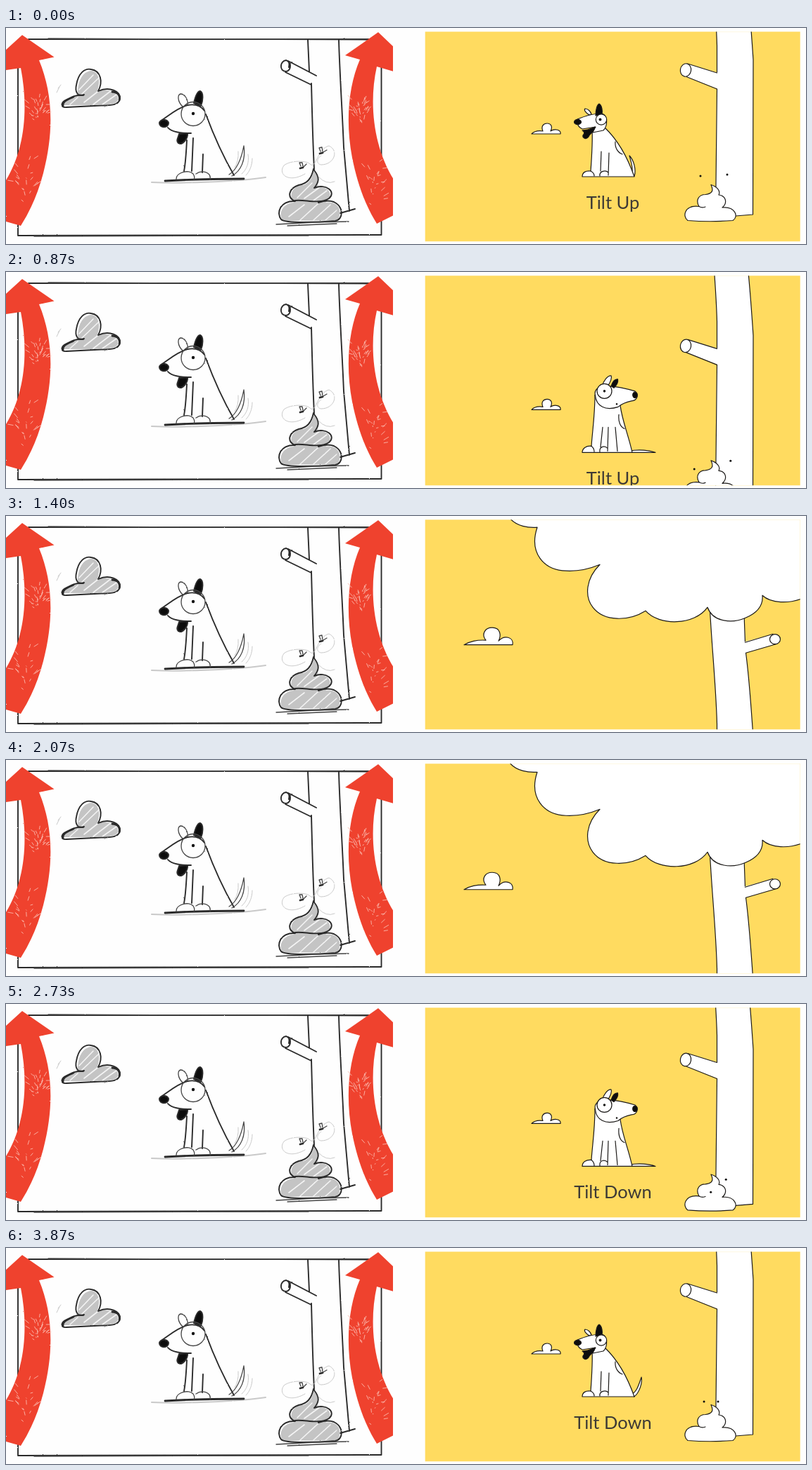
Write an HTML page that moves like this. It is 1137 px wide and 308 px high and loops after 3.94 s.

```html
<!DOCTYPE html>
<html lang="en">
<head>
<meta charset="utf-8">
<title>Tilt</title>
<style>
  html, body { margin: 0; width: 100%; height: 100%; overflow: hidden; background: #fefefe; }
  svg { display: block; width: 1137px; height: 308px; }
  .ink, .pencil { stroke-linecap: round; stroke-linejoin: round; }
  .ink { fill: #fff; stroke: #1c1a18; stroke-width: 1.2; }
  .pencil { fill: none; stroke: #2b2b2b; stroke-width: 1.9; }
  .line { fill: none; }
  .solid { fill: #0d0d0d; }
  .gray { fill: #c4c4c4; stroke: none; }
  .faint { stroke: #c9c9c9; stroke-width: 1; }
  .thin { stroke: #444; stroke-width: 1.3; }
  .bold { stroke-width: 2.8; }
  .hatch { stroke: #f4f4f4; stroke-width: 1.6; }
  text { font: 25.5px Lato, "Open Sans", sans-serif; fill: #3d3a35; text-anchor: middle; }
</style>
</head>
<body>
<svg viewBox="0 0 1137 308">
  <defs>
    <filter id="rough" filterUnits="userSpaceOnUse" x="0" y="0" width="552" height="308">
      <feTurbulence type="fractalNoise" baseFrequency=".5" numOctaves="2" seed="4" result="n"/>
      <feDisplacementMap in="SourceGraphic" in2="n" scale="1.7" xChannelSelector="R" yChannelSelector="G"/>
    </filter>
    <clipPath id="left"><rect width="550" height="308"/></clipPath>
    <clipPath id="stage"><rect x="595.7" y="5.3" width="533" height="299"/></clipPath>
  </defs>

  <g clip-path="url(#left)">
    <g class="pencil" filter="url(#rough)">
      <path d="M32 16H533.500V295M17 40V296L533 295"/>
      <path class="thin" d="M60 15L520 17M40 297L430 296"/>

      <!-- cloud -->
      <path class="gray" d="M82 110C81 103 92 97 102 97C101 76 109 62 121 61C133 62 134 77 130 90C147 86 160 92 159 102C158 109 146 109 132 110Z"/>
      <path class="hatch" d="M104 88L124 67M108 94L131 72M111 106L130 91M124 109L150 89M137 109L157 95M91 109L102 99"/>
      <path d="M111 95C101 99 98 90 100 81C103 64 112 57 121 59C135 61 138 77 131 90C147 83 163 90 162 101C160 112 144 110 126 111L86 113C76 114 78 105 87 102C94 98 100 95 110 96"/>
      <path class="bold" d="M81 111C80 104 88 102 96 98M151 91Q163 92 161 103"/>
      <path class="faint" d="M72 92l4-8M74 86l4-5"/>

      <!-- tree -->
      <path d="M429 17L431 62M434 79C435 120 436 160 438 202M473 17C474 60 478 120 480 170L488 261M475 264L496 258"/>
      <path d="M401 47L441 68M397 63L434 81M400 47C407 52 404 61 398 62C388 62 389 47 398 46Q404 47 402 56"/>

      <!-- dog -->
      <path class="faint" d="M207 220C250 222 330 219 369 213" style="stroke-width:2"/>
      <path class="bold" d="M226 218C260 216 300 215 338 215"/>
      <path class="thin" d="M251 112C243 104 244 95 248 94C254 94 259 102 258 108"/>
      <path class="solid" d="M267 107C269 98 272 90 276 90C281 92 280 104 277 111Z"/>
      <path d="M222 131C234 123 244 114 258 110Q274 107 282 118M230 142C236 149 249 150 263 150"/>
      <circle class="thin" cx="266" cy="122.500" r="17"/>
      <circle cx="266" cy="122" r="2.2" fill="#111" stroke="none"/>
      <ellipse class="solid" cx="224.500" cy="136" rx="6.500" ry="5.300"/>
      <path class="solid" d="M246 151L258 150C259 158 250 168 245 164C241 161 245 156 246 151Z"/>
      <path d="M284 123C294 150 308 182 324 210M257 160C256 180 255 194 253 204M266 157L264 204M280 180L279 206"/>
      <path class="thin" d="M242 216C241 206 260 201 266 208C269 213 267 216 267 216M270 208C278 202 292 205 290 216"/>
      <path class="thin" d="M321 211C334 204 341 188 338 168C335 184 330 201 317 209"/>
      <path class="faint" d="M344 180C346 192 342 202 335 208M350 186C350 196 346 205 341 210M330 176Q331 190 325 199"/>

      <!-- pile and flies -->
      <path class="gray" d="M394 275C386 267 392 250 409 249C400 238 409 223 423 224C433 220 436 211 437 204C445 211 444 221 440 227C460 225 467 238 454 249C473 245 479 263 471 274Z"/>
      <path class="hatch" d="M414 242L435 221M424 243L446 227M437 246L456 232M402 269L424 252M418 274L443 251M437 274L461 252M454 274L470 260"/>
      <path d="M437 201C434 215 428 222 416 224C401 229 399 242 411 247C389 246 384 264 391 273C397 279 445 277 468 275C480 273 480 255 466 248C458 245 450 247 444 249M438 203C447 214 444 221 438 228C455 221 470 234 459 243C444 252 425 244 411 246"/>
      <path class="thin" d="M384 280L440 277L487 276M400 282L470 279"/>
      <path class="faint" d="M425 208C401 222 386 208 395 196C405 188 428 189 432 194C441 202 442 172 459 168C474 175 466 195 448 195C440 194 442 185 448 182M444 212Q455 224 467 219"/>
      <path class="bold" d="M418 200L422 199M446 179L450 178"/>
      <path class="thin" d="M419 197l-2-5 4 0 1 5M423 198l4-4M447 176l-2-5 4-1 1 6M451 177l5-3"/>
    </g>

    <g filter="url(#rough)">
      <path fill="#ef432e" d="M23 10L68.500 41.500L47 46C66 92 69 145 53 207Q42 249 21 282L0 276V217C27 173 32 114 21 57L0 60V31Z"/>
      <path fill="#ef432e" d="M529 6L551 27V62L527 55C515 109 523 171 551 216V267L527 279C509 250 499 219 492 185C482 132 487 82 503 45L482 39Z"/>
      <g id="scratches" stroke="#fbb9ae" stroke-width=".9" stroke-linecap="round"/>
    </g>
  </g>

  <rect x="595.7" y="5.3" width="533" height="299" fill="#ffdb60"/>
  <g clip-path="url(#stage)">
    <g id="world" class="ink">
      <!-- trunk and branches -->
      <path stroke="none" d="M1000 -146C1003 -85 1009 -30 1010.500 25L1008.500 268H1037L1061.500 266L1062 45C1059 0 1055 -50 1051.500 -76L1048.500 -146Z"/>
      <path class="line" d="M1000 -146C1003 -85 1009 -30 1010.500 25V64M1010.500 87L1008.500 268M1037 268L1061.500 266L1062 45C1059 0 1055 -50 1051.500 -76M1050.500 -91L1048.500 -146"/>
      <path stroke="none" d="M969 51L1012 64V87L965 69ZM1050 -92L1091 -103L1095 -89L1051 -76Z"/>
      <path class="line" d="M969 51L1010.500 64M967 69.500L1010.500 87M1050.500 -91L1090 -103M1051.500 -76L1096 -89"/>
      <ellipse cx="966" cy="60" rx="7.600" ry="9.300" transform="rotate(10 966 60)"/>
      <ellipse cx="1093" cy="-95.500" rx="7.500" ry="7"/>

      <path d="M700 -310L717 -267C726 -257 742 -254 755 -255C743 -219 764 -194 796 -193C815 -192 832 -197 844 -202C824 -182 822 -157 834 -141C850 -120 885 -121 909 -136C928 -114 979 -115 997 -141C1005 -119 1033 -118 1051 -126Q1077 -137 1075 -158C1087 -147 1112 -145 1135 -155V-320Z"/>

      <!-- clouds -->
      <path d="M651 -87.500C658 -92 670 -95 682 -94C675 -103 681 -112 691 -112C703 -112 704 -101 700 -93C708 -102 722 -99 720 -87.500Z"/>
      <path d="M747 151C751 147 757 146 763 147C760 140 764 136 769 136C775 136 777 141 774 147C780 143 789 145 788 151Z"/>

      <!-- pile -->
      <path d="M969 274.500C961 269 964 252 985 254.500C980 246 984 237.500 994 237.500C1004 236 1006 232 1002 223.500C1010 226 1016 232 1013 238C1023 239 1026 249 1018 256C1036 254 1042 269 1033 274.500Q1000 277 969 274.500Z"/>
      <path class="line" d="M985 254.500Q989 257 994 255"/>

      <!-- dog facing left -->
      <g id="dogL">
        <path id="tail" d="M887 211C893 205 889 193 886 182C892 188 896 202 893 211Z"/>
        <path d="M833 143C834 165 832 190 831 204C824 203 819 206 819 212H893C886 192 874 164 851 142Z"/>
        <path class="line" d="M846 176L845 204M857 178L856 210M844 211C843 204 852 202 856 206M831 204C835 206 836 209 836 211M866 162C865 171 870 178 876 180"/>
        <g id="head">
          <path d="M829 124C824 121 821 117 823 115C827 115 831 119 832 123Z"/>
          <path d="M812 130C822 126 832 122 847 122C856 125 855 140 849 146L834 149C834 145 838 142 838 141L819 144C814 142 811 138 812 130Z"/>
          <path class="solid" d="M819 146C828 146 832 143 837 141C837 148 830 150 828 155C825 160 819 157 820 153Q824 149 819 146Z"/>
          <path class="solid" d="M838 125C838 117 840 109 843 108C847 110 848 118 847 124Z"/>
          <circle cx="846" cy="130.500" r="7.700"/>
          <circle class="solid" cx="844.500" cy="130.500" r="1.400"/>
          <ellipse class="solid" cx="812.500" cy="134" rx="5" ry="3.700"/>
        </g>
      </g>

      <!-- dog facing right -->
      <g id="dogR">
        <path d="M885 210C900 207 915 209 923 212H885Z"/>
        <path d="M837 130C837 160 833 185 832 203C825 202 819 206 819 212H890C885 188 876 168 873 145Z"/>
        <path class="line" d="M848 176L845 204M856 176L855 210M866 176L869 210M844 211C843 203 851 202 855 206M832 203Q836 206 836 211M871 158C870 168 873 176 879 178"/>
        <path d="M847 118C849 110 855 102 860 102.500C862 106 858 113 855 118Z"/>
        <path d="M837.500 131C835 121 844 117 855 117C868 118 882 121 894 124.500C900 130 897 138 889 138.500Q877 141 870 147C852 153 839 146 837.500 131Z"/>
        <path class="solid" d="M860 117.500C862 111 865 107 869.500 107.500C870.500 112 868 116 864 120Z"/>
        <circle cx="850.500" cy="124.500" r="10.500"/>
        <circle class="solid" cx="850.500" cy="124.500" r="1.200"/>
        <circle class="solid" cx="868" cy="143" r=".7"/>
        <ellipse class="solid" cx="894" cy="130" rx="3.300" ry="4.200"/>
      </g>

      <text id="label" x="862.500" y="257.500" stroke="none">Tilt Up</text>
      <circle id="flyA" class="solid" r="1.500" stroke="none"/>
      <circle id="flyB" class="solid" r="1.500" stroke="none"/>
    </g>
  </g>
</svg>
<script>
  const LOOP = 3940, STEP = 1000 / 15, RISE = 273, PAN = 1020;
  const $ = id => document.getElementById(id);

  // [time, x, y]
  const PATH_A = [[0, 987, 211], [200, 980, 222], [400, 990, 236], [600, 996, 216], [870, 978, 236],
    [3070, 1006, 251], [3200, 990, 240], [3400, 985, 220], [3600, 995, 214], [3870, 992, 219], [LOOP, 987, 211]];
  const PATH_B = [[0, 1025, 209], [200, 1015, 215], [400, 1025, 225], [600, 1013, 211], [870, 1030, 224],
    [3070, 1022, 232], [3250, 1010, 215], [3450, 1022, 222], [3650, 1014, 213], [3870, 1012, 219], [LOOP, 1025, 209]];

  function along(path, t) {
    const i = Math.max(1, path.findIndex(p => p[0] >= t));
    const [a, b] = [path[i - 1], path[i]];
    const u = (t - a[0]) / (b[0] - a[0]);
    return [a[1] + (b[1] - a[1]) * u, a[2] + (b[2] - a[2]) * u];
  }

  // cubic-bezier(.76, 0, .24, 1)
  function ease(x) {
    if (x <= 0) return 0;
    if (x >= 1) return 1;
    let lo = 0, hi = 1, s;
    for (let i = 0; i < 24; i++) {
      s = (lo + hi) / 2;
      const q = 1 - s;
      if (2.28 * q * q * s + .72 * q * s * s + s * s * s < x) lo = s; else hi = s;
    }
    return s * s * (3 - 2 * s);
  }

  // short strokes fanning upwards, densest in the middle
  function scratch(seed, cx, cy, w, h, n) {
    const rnd = () => (seed = seed * 16807 % 2147483647) / 2147483647;
    const mid = () => (rnd() + rnd()) / 2 - .5;
    let d = "";
    for (let i = 0; i < n; i++) {
      const dx = mid() * w;
      d += `M${cx + dx} ${cy + mid() * h}l${dx * .4 + rnd() * 2 - 1} ${-rnd() * 6}`;
    }
    return `<path d="${d}"/>`;
  }
  $("scratches").innerHTML = scratch(11, 46, 116, 28, 44, 34) + scratch(29, 28, 222, 40, 80, 22) +
    scratch(47, 504, 116, 28, 44, 34) + scratch(83, 522, 224, 36, 76, 22);

  function place(fly, [x, y]) {
    fly.setAttribute("cx", x);
    fly.setAttribute("cy", y);
  }

  function draw() {
    const now = performance.now() % LOOP;
    const step = Math.min(58, Math.floor((now + 5) / STEP));
    const t = step * STEP;
    const tilt = RISE * (ease((t - 482) / PAN) - ease((t - 2000) / PAN));
    const right = t > 665 && t < 2795;
    const wag = 2 * Math.PI * (t < 2000 ? step : step - 46) / 8;

    $("world").setAttribute("transform", `translate(0 ${tilt.toFixed(2)})`);
    $("dogL").style.display = right ? "none" : "";
    $("dogR").style.display = right ? "" : "none";
    $("tail").setAttribute("transform", `rotate(${17 * (1 - Math.cos(wag))} 891 211)`);
    $("head").setAttribute("transform", `translate(0 ${(1 - Math.cos(wag)) / 2})`);
    $("label").textContent = t < 1800 ? "Tilt Up" : "Tilt Down";
    place($("flyA"), along(PATH_A, t));
    place($("flyB"), along(PATH_B, t));
    requestAnimationFrame(draw);
  }
  draw();
</script>
</body>
</html>
```
